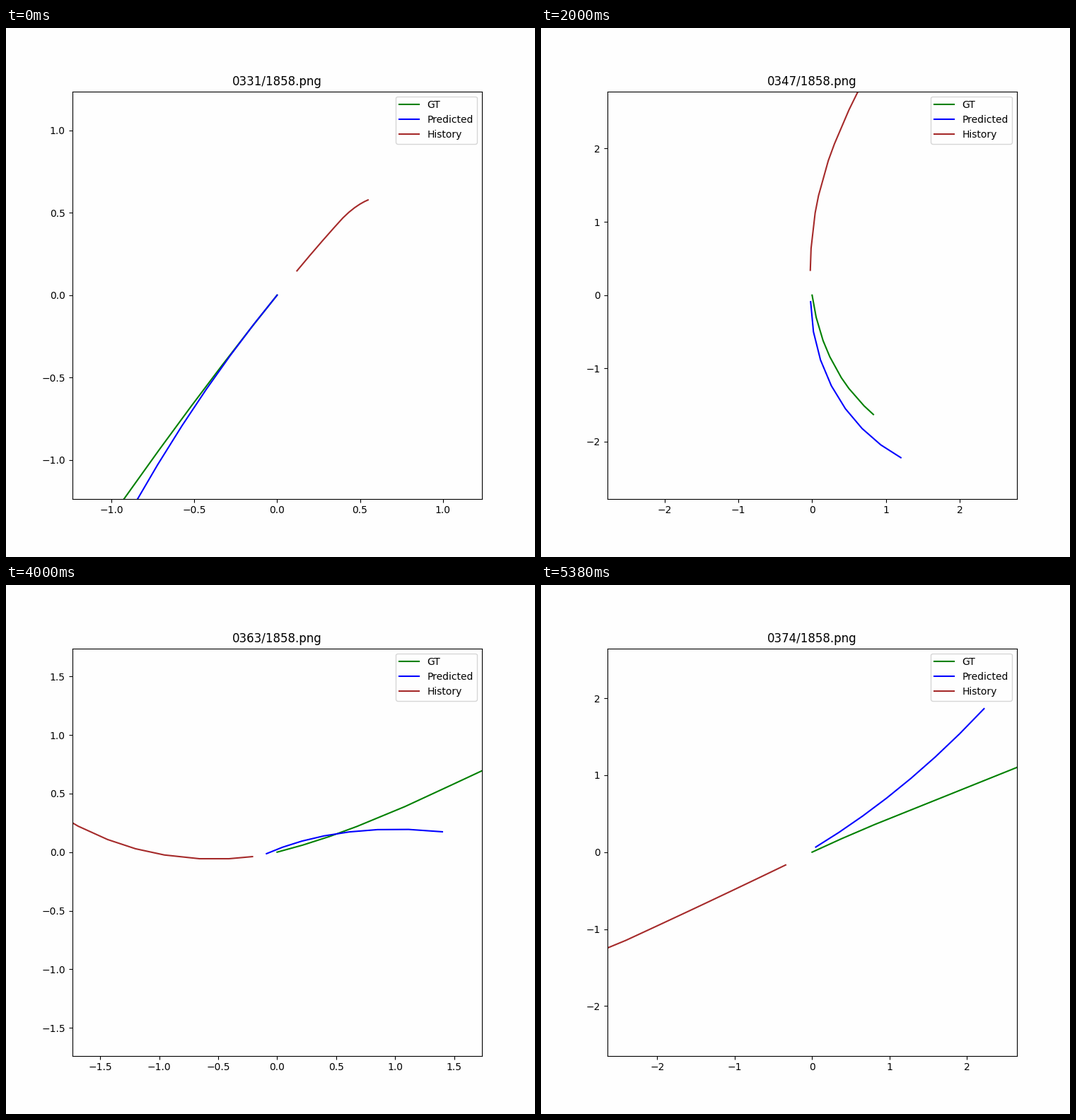
Recreate the animation shown at these times as a matplotlib script. Size 748 by 748 pixels, loop 5510 ms.

```python
import matplotlib.pyplot as plt
import numpy as np
from matplotlib.animation import FuncAnimation

STAGE, DPI = 748, 100
TICK_MS, TICKS = 29, 190
STEP_MS, STEPS = 125, 44
FIRST, TOTAL = 331, 1858
PAST, FUTURE = 10, 8
PAPER = "#fefefe"

# (time step, value) keys that steer the vehicle: degrees and distances
HEADING = [(0, 205), (5, 228), (10, 231.7), (15, 235.3), (18, 244), (20, 250),
           (24, 268), (39, 360), (42, 375.5), (46, 385), (52, 386), (55, 382)]
SPEED = [(0, 0.025), (4, 0.05), (6, 0.11), (8, 0.12), (10, 0.26), (13, 0.33),
         (15, 0.55), (17, 0.38), (24, 0.36), (30, 0.245), (37, 0.25),
         (38, 0.3), (40, 0.2), (44, 0.25), (45, 0.44), (47, 0.45),
         (48, 0.25), (49, 0.38), (52, 0.38), (54, 0.46)]
# Long and short steps take turns by this much
SWING = [(16, 0), (17, 0.13), (23, 0.125), (25, 0), (29, 0.06), (33, 0.08),
         (36, 0)]

# step, view half width, start x, start y, heading, turn, stride, growth
FORECAST = np.array([
    (0, 1.237, 0, 0, 231.5, 10, 0.265, 0.15),
    (9, 1.98, -0.085, -0.172, 246, 25, 0.44, 0),
    (16, 2.779, -0.02, -0.09, 275.3, 52, 0.367, -0.12),
    (27, 1.608, 0.01, -0.024, 336.7, 1.3, 0.31, 0),
    (32, 1.738, -0.09, -0.013, 382, -26, 0.217, 0.32),
    (39, 2.323, 0.085, 0.097, 398, 17, 0.386, 0),
    (43, 2.646, 0.047, 0.066, 392.5, 13.5, 0.404, 0.12),
]).T


def keyed(keys, at):
    return np.interp(at, *zip(*keys))


def walk(start, degrees, lengths):
    """Points reached by moving along each heading in turn."""
    angle = np.radians(degrees)
    moves = np.column_stack([np.cos(angle), np.sin(angle)]) * lengths[:, None]
    return np.cumsum(np.vstack([start, moves]), axis=0)


def make_route():
    n = np.arange(PAST + STEPS + FUTURE)
    sign = np.where(n % 2, 1, -1)
    return walk((0, 0), keyed(HEADING, n),
                keyed(SPEED, n) + sign * keyed(SWING, n))


def forecast(step):
    size, x, y, heading, turn, stride, growth = (
        np.interp(step, FORECAST[0], row) for row in FORECAST[1:])
    u = np.linspace(0, 1, FUTURE - 1)
    lengths = stride * (1 + growth * (2 * u - 1))
    return size, walk((x, y), heading + turn * u, lengths)


route = make_route()
fig, ax = plt.subplots(figsize=(STAGE / DPI, STAGE / DPI), dpi=DPI,
                       facecolor=PAPER)
ax.set_facecolor(PAPER)
truth, = ax.plot([], [], color="green", label="GT")
guess, = ax.plot([], [], color="blue", label="Predicted")
history, = ax.plot([], [], color="brown", label="History")
title = ax.set_title("")
ax.legend(loc="best")


def draw(tick):
    step = min((tick + 1) * TICK_MS // STEP_MS, STEPS - 1)
    now = step + PAST
    local = route - route[now]
    size, path = forecast(step)
    truth.set_data(*local[now:now + FUTURE].T)
    guess.set_data(*path.T)
    history.set_data(*local[step:now].T)
    ax.set_xlim(-size, size)
    ax.set_ylim(-size, size)
    title.set_text(f"{FIRST + step:04d}/{TOTAL}.png")
    return truth, guess, history, title


anim = FuncAnimation(fig, draw, frames=TICKS, interval=TICK_MS,
                     init_func=lambda: draw(0), repeat=True, repeat_delay=0)
plt.show()
```
